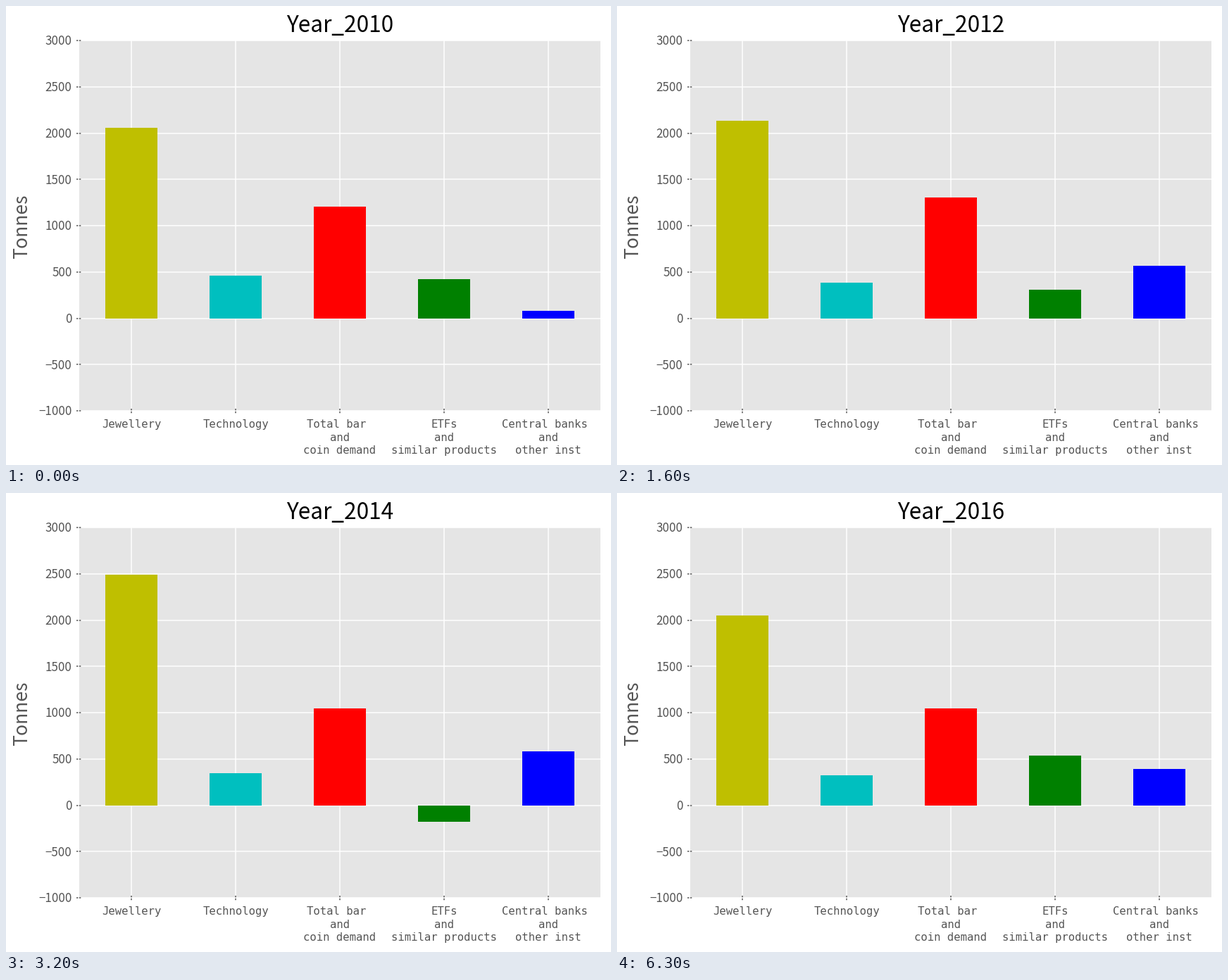
These frames come from a looping animation (859x652 px, 7300 ms). A matplotlib script:

```python
import matplotlib.pyplot as plt
from matplotlib.animation import FuncAnimation

W, H, DPI = 859, 652, 64
LEFT, RIGHT, TOP, BOTTOM = 104, 844, 49, 575
PT = 72 / DPI
GRAY = "#555555"
SANS, MONO = "Noto Sans CJK JP", "DejaVu Sans Mono"
LABEL_SIZE = 15.6
CELL = 0.602 * LABEL_SIZE

STEP_MS, YEAR_MS, LOOP_MS = 100, 800, 7300
YEARS = range(2010, 2017)

# label, colour, tonnes per year; a trailing space shifts a line half a cell left
SERIES = [
    ("Jewellery", "#bfbf00", [2055, 2095, 2136, 2696, 2490, 2407, 2050]),
    ("Technology", "#00bfbf", [460, 428, 382, 355, 348, 330, 323]),
    ("Total bar \nand\ncoin demand", "#ff0000",
     [1202, 1497, 1304, 1715, 1043, 1068, 1045]),
    ("ETFs\nand\nsimilar products", "#008000",
     [421, 239, 306, -913, -182, -126, 535]),
    ("Central banks \nand\nother inst", "#0000ff",
     [79, 481, 569, 625, 583, 577, 391]),
]

fig = plt.figure(figsize=(W / DPI, H / DPI), dpi=DPI, facecolor="white")
ax = fig.add_axes([LEFT / W, 1 - BOTTOM / H, (RIGHT - LEFT) / W, (BOTTOM - TOP) / H])


def put_text(x, y, text, size, font=SANS, color=GRAY, **kw):
    kw = {"ha": "center", "va": "baseline", **kw}
    return fig.text(x / W, 1 - y / H, text, fontsize=size * PT, family=font,
                    color=color, **kw)


def put_tick(xs, ys):
    fig.add_artist(plt.Line2D([x / W for x in xs], [1 - y / H for y in ys],
                              color=GRAY, lw=1.5 * PT, dash_capstyle="butt",
                              linestyle=(0, (1.6, 1))))


def style_axes():
    ax.set_facecolor("#e5e5e5")
    ax.set_xlim(-0.5, 4.5)
    ax.set_ylim(-1000, 3000)
    ax.set_xticks(range(5))
    ax.set_yticks(range(-1000, 3001, 500))
    ax.tick_params(length=0, labelleft=False, labelbottom=False)
    ax.grid(color="white", lw=1.5 * PT)
    ax.set_axisbelow(True)
    ax.spines[:].set_visible(False)


def label_axes():
    for value in range(-1000, 3001, 500):
        y = BOTTOM - (value + 1000) / 4000 * (BOTTOM - TOP)
        put_text(93.5, y + 6.3, str(value).replace("-", "\u2212"), 17, ha="right")
        put_tick((100, 106.5), (y, y))
    for i, (label, _, _) in enumerate(SERIES):
        x = LEFT + (i + 0.5) * (RIGHT - LEFT) / 5
        put_tick((x, x), (572, 578.5))
        for row, line in enumerate(label.split("\n")):
            shift = CELL / 2 if line.endswith(" ") else 0
            put_text(x - shift, 599 + 18.6 * row, line.strip(), LABEL_SIZE, MONO)
    put_text(36, 313, "Tonnes", 26.5, rotation=90, ha="right", va="center")


style_axes()
label_axes()
bars = ax.bar(range(5), [0] * 5, width=0.5, color=[s[1] for s in SERIES])
title = put_text(398, 37.5, "", 31.6, color="black", ha="left")


def update(frame):
    k = min(frame * STEP_MS // YEAR_MS, len(YEARS) - 1)
    title.set_text(f"Year_{YEARS[k]}")
    for bar, (_, _, tonnes) in zip(bars, SERIES):
        bar.set_height(tonnes[k])
    return [title, *bars]


anim = FuncAnimation(fig, update, frames=LOOP_MS // STEP_MS, interval=STEP_MS,
                     repeat=True, repeat_delay=0)
plt.show()
```
